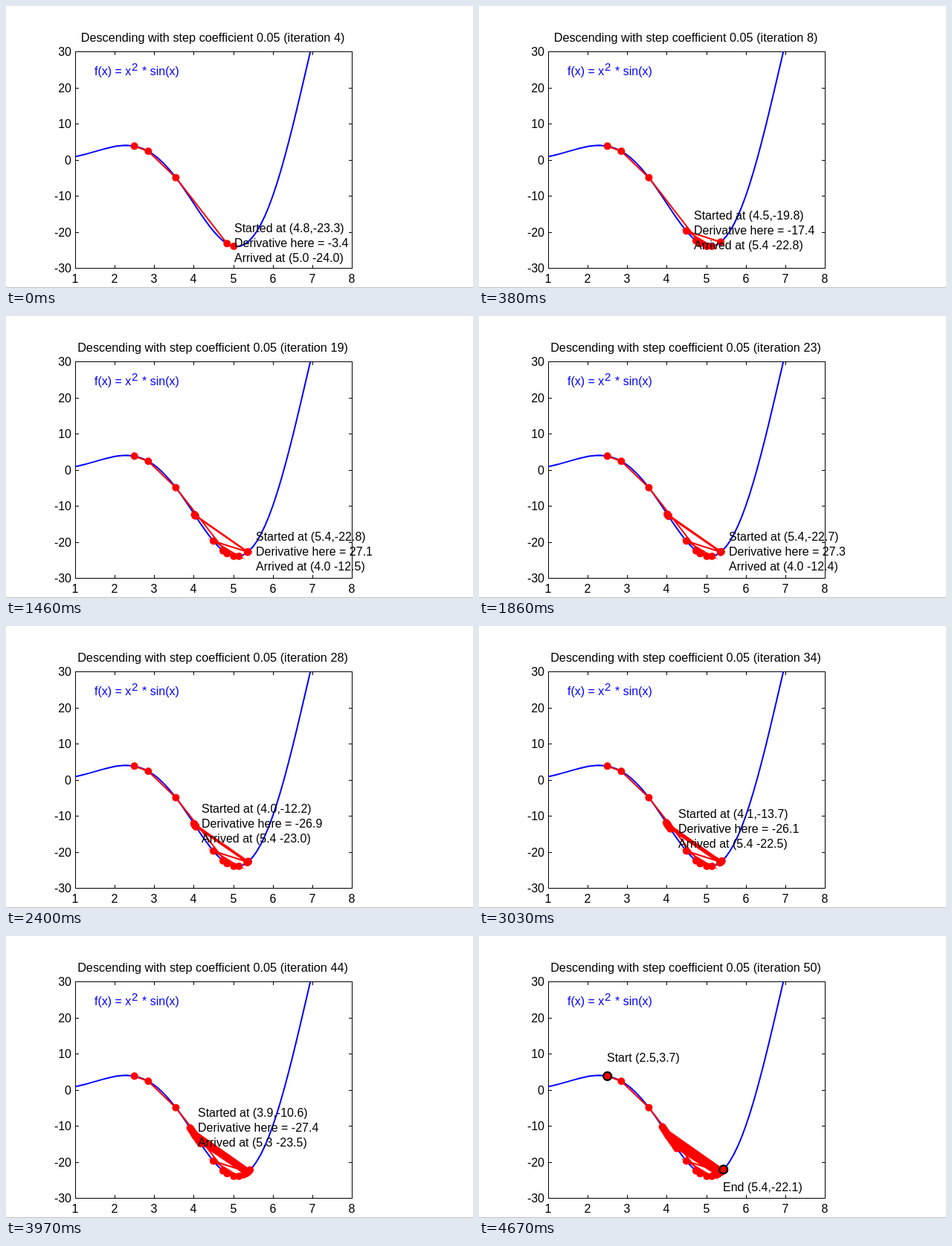
Write an HTML page with a canvas that moves like this. It is 628x379 px and loops after 4970 ms.

```html
<!DOCTYPE html>
<html lang="en">
<head>
<meta charset="utf-8">
<title>Gradient descent</title>
<style>
  html, body { margin: 0; width: 100%; height: 100%; overflow: hidden; background: #fff; }
  canvas { display: block; }
</style>
</head>
<body>
<canvas id="stage" width="628" height="379"></canvas>
<script>
const ctx = document.getElementById('stage').getContext('2d');
const LOOP = 4970, FIRST = 4, LAST = 50;
const BOX = { x: 93, y: 61, w: 372, h: 291 };
const RED = '#f00', BLUE = '#00f', BLACK = '#000';

const f = x => x * x * Math.sin(x);
const slope = x => 2 * x * Math.sin(x) + 2 * x * x * Math.cos(x);
const px = x => BOX.x + (x - 1) * BOX.w / 7;
const py = y => BOX.y + (30 - y) * BOX.h / 60;

// Positions visited by the descent
const path = [2.5];
for (let i = 0; i < LAST; i++) path.push(path[i] - 0.05 * slope(path[i]));

const curve = Array.from({ length: 71 }, (_, i) => 1 + i / 10);

// Bursts of iterations: first change, last change, number of changes
const bursts = [
  [70, 70, 1], [220, 380, 3], [530, 760, 4], [930, 1160, 4], [1310, 1460, 3],
  [1630, 1860, 4], [2010, 2170, 3], [2320, 2550, 4], [2720, 2880, 3],
  [3030, 3270, 4], [3430, 3650, 4], [3800, 3970, 3], [4120, 4350, 4], [4520, 4670, 3]
];
const changes = bursts.flatMap(([from, to, n]) =>
  Array.from({ length: n }, (_, i) => Math.ceil((from + (to - from) * i / Math.max(1, n - 1)) / 10) * 10));

function text(str, x, y, align = 'left', color = BLACK, size = 16) {
  ctx.font = `${size}px "Liberation Sans", Arial, sans-serif`;
  ctx.textAlign = align;
  ctx.fillStyle = color;
  ctx.fillText(str, Math.round(x), Math.round(y));
}

function plot(xs, color) {
  ctx.beginPath();
  xs.forEach(x => ctx.lineTo(px(x), py(f(x))));
  ctx.strokeStyle = color;
  ctx.lineWidth = 2;
  ctx.stroke();
}

function dot(x, ring) {
  ctx.beginPath();
  ctx.arc(px(x), py(f(x)), ring ? 5.5 : 5, 0, 2 * Math.PI);
  ctx.fillStyle = RED;
  ctx.fill();
  if (!ring) return;
  ctx.strokeStyle = BLACK;
  ctx.lineWidth = 2.3;
  ctx.stroke();
}

function axes() {
  const { x, y, w, h } = BOX;
  ctx.strokeStyle = BLACK;
  ctx.lineWidth = 1;
  ctx.strokeRect(x + 0.5, y + 0.5, w, h);
  ctx.fillStyle = BLACK;
  for (let v = 1; v <= 8; v++) {
    const tx = Math.round(px(v));
    ctx.fillRect(tx, y, 1, 5);
    ctx.fillRect(tx, y + h - 4, 1, 5);
    text(v, tx, y + h + 20, 'center');
  }
  for (let v = -30; v <= 30; v += 10) {
    const ty = Math.round(py(v));
    ctx.fillRect(x, ty, 5, 1);
    ctx.fillRect(x + w - 4, ty, 5, 1);
    text(v, x - 5, ty + 6, 'right');
  }
}

function pair(x, separator) {
  return `(${x.toFixed(1)}${separator}${f(x).toFixed(1)})`;
}

function draw(step) {
  const done = step > LAST, n = Math.min(step, LAST);
  const visited = path.slice(0, n + 1);
  ctx.fillStyle = '#fff';
  ctx.fillRect(0, 0, 628, 379);
  ctx.fillStyle = '#c0c0c0';
  ctx.fillRect(0, 378, 628, 1);

  axes();
  text(`Descending with step coefficient 0.05 (iteration ${n})`, 277.5, 48, 'center', BLACK, 16.25);
  text('f(x) = x', 119, 93, 'left', BLUE);
  text('2', 169, 87, 'left', BLUE, 15);
  text('* sin(x)', 183, 93, 'left', BLUE);

  ctx.save();
  ctx.beginPath();
  ctx.rect(BOX.x, BOX.y, BOX.w, BOX.h);
  ctx.clip();
  plot(curve, BLUE);
  ctx.restore();
  plot(visited, RED);
  visited.forEach(x => dot(x));

  const start = path[0], end = path[n], from = path[n - 1];
  if (done) {
    dot(start, true);
    dot(end, true);
    text('Start ' + pair(start, ','), px(start) - 1, py(f(start) + 5) + 5);
    text('End ' + pair(end, ','), px(end) - 1, py(f(end) - 5) + 5);
  } else {
    [
      'Started at ' + pair(from, ','),
      'Derivative here = ' + slope(from).toFixed(1),
      'Arrived at ' + pair(end, ' ')
    ].forEach((line, i) => text(line, px(from + 0.2) - 0.5, py(f(from)) + 5 + (i - 1) * 20));
  }
}

let shown;
function tick() {
  const t = performance.now() % LOOP;
  const step = FIRST + changes.filter(c => c <= t).length;
  if (step !== shown) draw(shown = step);
  requestAnimationFrame(tick);
}
tick();
</script>
</body>
</html>
```
